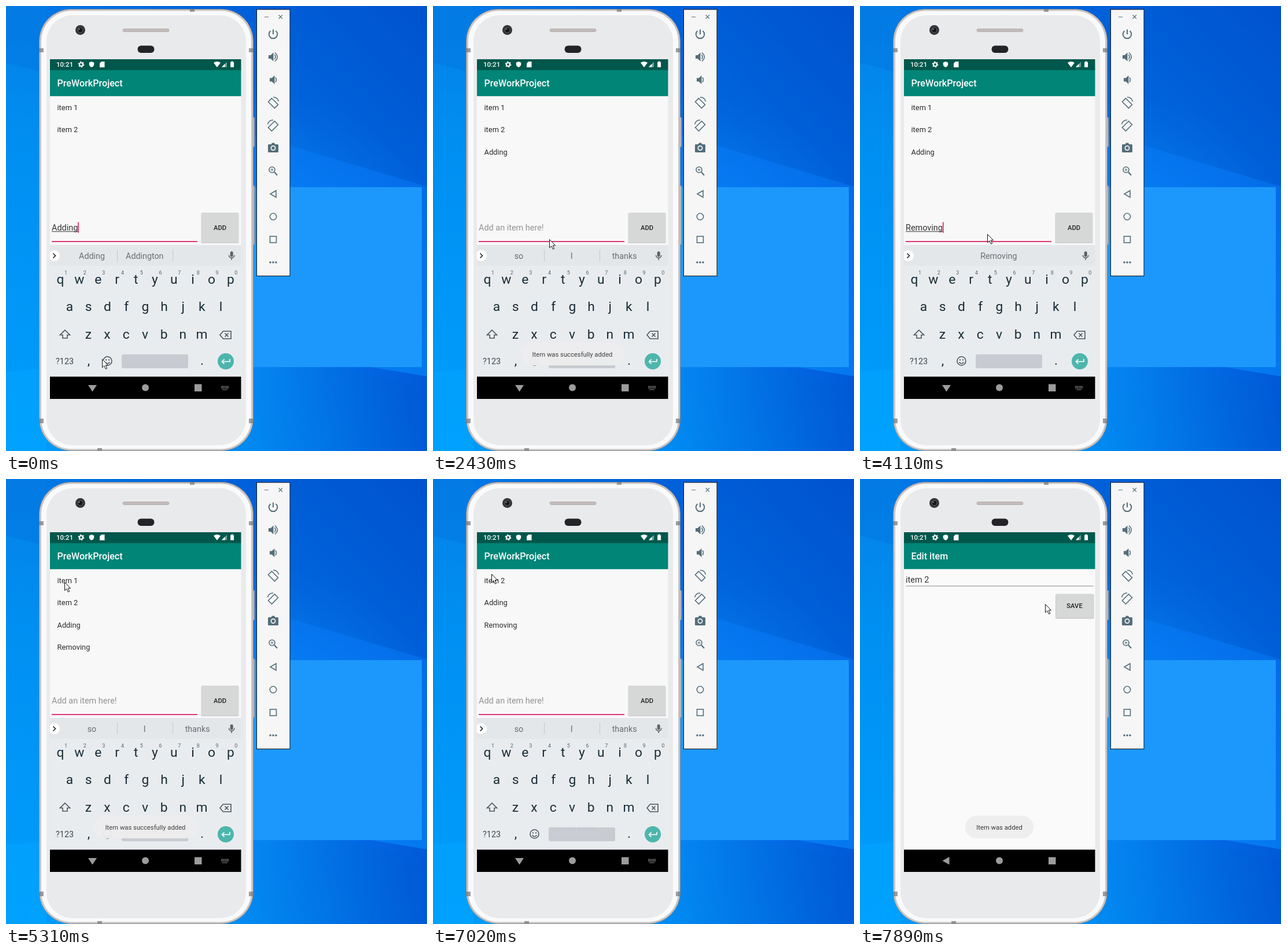
An HTML page that plays this animation: 728x769 px, repeating every 8000 ms.

```html
<!DOCTYPE html>
<html lang="en">
<head>
<meta charset="utf-8">
<title>List app demo</title>
<style>
  html, body { margin: 0; width: 100%; height: 100%; overflow: hidden; }
  svg { display: block; width: 100vw; height: 100vh; }
  text { font-family: Roboto, sans-serif; white-space: pre; }
  .mid { text-anchor: middle; }
  .bold { font-weight: 500; }
  .line { fill: none; stroke-width: 1.6; }
</style>
</head>
<body>
<svg viewBox="0 0 728 769">
  <defs>
    <linearGradient id="sky" x1="0" y1="1" x2="1" y2="0">
      <stop offset="0" stop-color="#009cfa"/><stop offset=".4" stop-color="#0088f0"/>
      <stop offset=".72" stop-color="#0064dc"/><stop offset="1" stop-color="#0052ce"/>
    </linearGradient>
    <radialGradient id="glow" gradientUnits="userSpaceOnUse" cx="440" cy="480" r="330">
      <stop offset="0" stop-color="#0a90fa" stop-opacity=".9"/><stop offset="1" stop-color="#0a80f0" stop-opacity="0"/>
    </radialGradient>
    <linearGradient id="left" x1="0" y1="0" x2="0" y2="1">
      <stop offset="0" stop-color="#0480e6"/><stop offset=".35" stop-color="#0090f2"/><stop offset="1" stop-color="#009efc"/>
    </linearGradient>
    <linearGradient id="shade" x1="0" y1="0" x2="1" y2="0">
      <stop offset="0" stop-color="#0058d8" stop-opacity="0"/><stop offset="1" stop-color="#0052d2" stop-opacity=".8"/>
    </linearGradient>
    <clipPath id="screen"><rect x="76" y="92" width="330.500" height="587"/></clipPath>
  </defs>

  <!-- wallpaper -->
  <rect width="728" height="769" fill="url(#sky)"/>
  <rect width="728" height="769" fill="url(#glow)"/>
  <rect width="70" height="769" fill="url(#left)"/>
  <path d="M0 98L70 116V0H0Z" fill="#0070dc" opacity=".35"/>
  <path d="M0 632L70 626V769H0Z" fill="#00a8ff" opacity=".4"/>
  <path d="M400 214L728 312V660L400 585Z" fill="#0a7cfa" opacity=".45"/>
  <path d="M400 586L728 640V769H400Z" fill="url(#shade)"/>
  <rect x="408" y="313" width="311" height="311" fill="#1c98fd"/>

  <!-- phone body -->
  <g fill="#d8d3d2" stroke="#8f8a8a" stroke-width=".8">
    <rect x="424" y="192" width="5.5" height="52" rx="2"/>
    <rect x="424" y="310" width="5.5" height="103" rx="2"/>
    <rect x="57.5" y="5.5" width="370" height="763" rx="55" fill="#cbc5c4"/>
  </g>
  <rect x="61" y="8.5" width="363" height="757" rx="52" fill="#fafafb"/>
  <rect x="70" y="16" width="345" height="743" rx="45" fill="#e9eaec"/>
  <path d="M57 73h8v7h-8zM420 73h8v7h-8zM57 713h8v8h-8zM420 713h8v8h-8zM318 5h8v5h-8zM158 764h8v4h-8z" fill="#77777a" opacity=".7"/>
  <circle cx="128.5" cy="41.500" r="8.500" fill="#343438"/>
  <circle cx="128.5" cy="41.500" r="4.500" fill="#17171a" stroke="#66666a"/>
  <circle cx="126.500" cy="40" r="1.200" fill="#888"/>
  <rect x="202" y="39.500" width="80" height="5" rx="2.500" fill="#c2bbba" stroke="#a29c9b" stroke-width=".6"/>
  <rect x="227.500" y="68.500" width="29" height="12.500" rx="6.200" fill="#242428"/>

  <g clip-path="url(#screen)">
    <rect x="76" y="91" width="331" height="588" fill="#f8f8f8"/>
    <rect x="76" y="110" width="331" height="45.800" fill="#008577"/>
    <rect x="76" y="91" width="331" height="19.800" fill="#00574b"/>
    <g fill="#fff">
      <text class="bold" x="87" y="105" font-size="11.500">10:21</text>
      <circle cx="130" cy="101" r="3" fill="none" stroke="#fff" stroke-width="2.200"/>
      <circle cx="130" cy="101" r="4.600" fill="none" stroke="#fff" stroke-width="1.600" stroke-dasharray="2 2.817"/>
      <path d="M148 96l4.200 1.700v3q0 3.600-4.200 5.300-4.200-1.700-4.200-5.300v-3z"/>
      <path d="M165 96h5.500v10h-8.500v-7z"/>
      <path d="M359 98q6-4 12 0l-6 8zM391 95.500h-1.300v1.200h-1.600v9h6v-9h-1.800v-1.200z"/>
      <path d="M382 96.500v9h-9z" opacity=".45"/><path d="M378.500 100v5.500h-5.500z"/>
    </g>
    <text id="title" class="bold" x="88.500" y="139.300" font-size="16.150" fill="#fff"></text>

    <g id="list">
      <g id="items" font-size="12.850" fill="#2b2b2b"></g>
      <text id="input" x="79" y="388" font-size="14.450"></text>
      <rect id="compose" x="79" y="389.300" height="1" fill="#333"/>
      <rect id="caret" y="373.500" width="1.600" height="18.500" fill="#d81b60"/>
      <rect x="79" y="406.200" width="252" height="1.700" fill="#d81b60"/>
      <rect x="337.500" y="358" width="65" height="52" rx="1.500" fill="#c9caca"/>
      <rect id="add" x="338" y="357" width="64" height="52" rx="1.500"/>
      <text class="mid bold" x="370" y="387" font-size="11.250" fill="#222">ADD</text>
    </g>

    <g id="edit">
      <rect x="76" y="155.800" width="331" height="486" fill="#fafafa"/>
      <text x="79" y="178.500" font-size="14.450" fill="#333">item 2</text>
      <rect x="79.500" y="184.500" width="324.500" height="1" fill="#8a8a8a"/>
      <rect x="338" y="199" width="66.500" height="42.500" rx="2" fill="#c8c9c9"/>
      <rect x="339" y="198.500" width="64.500" height="41.500" rx="1.500" fill="#d6d7d7"/>
      <text class="mid bold" x="371" y="223" font-size="11.250" fill="#222">SAVE</text>
    </g>

    <g id="keyboard">
      <rect x="76" y="413" width="331" height="228" fill="#e9ecef"/>
      <rect x="76" y="413" width="331" height="36" fill="#e4e7ea"/>
      <circle cx="83.500" cy="431.500" r="9.500" fill="#fff"/>
      <path class="line" d="M81.500 427.500l4 4-4 4" stroke="#222"/>
      <path id="dividers" d="M192.500 421v20M288.500 421v20" stroke="#c3c7ca"/>
      <g id="words" class="mid" font-size="14.300" fill="#686d71"></g>
      <rect x="387.700" y="424" width="5" height="9.500" rx="2.500" fill="#5c6266"/>
      <path class="line" d="M385.500 430.500a4.700 4.700 0 0 0 9.400 0M390.200 435.500v3.500" stroke="#5c6266" stroke-width="1.300"/>
      <g id="keys" class="mid" fill="#182c36"></g>
      <g class="line" stroke="#4c555b">
        <path d="M102 560l8.500 8.500h-4.500v5.500h-8v-5.500h-4.500z"/>
        <path d="M375.500 562h13.500v13h-13.500l-5.500-6.500zM378.500 565.500l6 6M384.500 565.500l-6 6"/>
        <circle cx="175.500" cy="613.500" r="7.500"/>
        <path d="M171.500 615.500q4 4.500 8 0"/>
      </g>
      <path d="M172 610.500h2v2h-2zM177 610.500h2v2h-2z" fill="#4c555b"/>
      <text x="86" y="619" font-size="14.400" fill="#3c464c">?123</text>
      <rect x="200" y="602" width="115" height="24" rx="3" fill="#c8cbd1"/>
      <circle cx="380" cy="614" r="14" fill="#4db6ac"/>
      <path class="line" d="M387 610v4.500h-13.500M377.500 610.500l-4 4 4 4" stroke="#fff"/>
    </g>

    <rect x="76" y="640.500" width="331" height="39"/>
    <g fill="#9c9c9c">
      <path id="back"/>
      <circle cx="241" cy="659.500" r="6"/>
      <rect x="326" y="653.500" width="12.500" height="12.500"/>
      <path id="switcher" d="M372 657.500h13M372 660h13M374.500 663h8" stroke="#9c9c9c" stroke-width="1.500" stroke-dasharray="1.500 .8"/>
    </g>

    <g id="toast">
      <rect id="pill" y="582" height="39" rx="19.500" fill="#eeeeef"/>
      <text id="message" class="mid" x="241" y="606" font-size="11.250" fill="#383838"></text>
    </g>
  </g>

  <!-- emulator tool bar -->
  <rect x="433.500" y="6" width="57.500" height="460.500" fill="#f6f6f6" stroke="#111"/>
  <g class="line" stroke="#546e7a" stroke-width="1.700">
    <path d="M447 19h7M471.500 15.500l6.500 6.500M478 15.500l-6.500 6.500" stroke-width="1.100"/>
    <path d="M462 40.500v8.500M457.500 43a7.300 7.300 0 1 0 9 0" stroke-width="2"/>
    <path d="M464.500 84q3 4 0 8M465 80.500q8.500 7.500 0 15"/>
    <path d="M466 123.500q3 4 0 8"/>
    <g id="rotate">
      <path d="M459.500 159.500l11 11-6 6-11-11z"/>
      <path d="M462 157.500q7.500 0 9.500 7.500" stroke-width="1.500"/>
    </g>
    <use href="#rotate" transform="matrix(-1 0 0 1 924 39.500)"/>
    <circle cx="460" cy="283" r="5"/>
    <path d="M464 287l5 5.500" stroke-width="2.200"/><path d="M457.500 283h5M460 280.500v5" stroke-width="1.100"/>
    <path d="M467 319v11.500l-10-5.700z"/>
    <circle cx="462" cy="364" r="5.700"/>
    <rect x="456.500" y="398" width="11" height="11"/>
  </g>
  <g fill="#546e7a">
    <path d="M454 85h3.500l5-4.500v15l-5-4.500h-3.500zM456 124.500h3.500l5-4.500v15l-5-4.500h-3.500z"/>
    <path d="M454.500 239h4l1.500-2.500h4l1.500 2.500h4q1.500 0 1.500 1.500v11q0 1.500-1.500 1.500h-15q-1.500 0-1.500-1.500v-11q0-1.500 1.500-1.500z"/>
    <circle cx="462" cy="245.500" r="3.600" fill="#546e7a" stroke="#f6f6f6" stroke-width="1.700"/>
    <circle cx="457" cy="443" r="1.800"/><circle cx="462" cy="443" r="1.800"/><circle cx="467" cy="443" r="1.800"/>
  </g>

  <path id="cursor" d="M.5.500v14.300l3.300-3.100 2.600 5.600 2.300-1-2.500-5.500h4.300z" fill="#fff" stroke="#111"/>
</svg>

<script>
const LOOP = 8000;
const $ = id => document.getElementById(id);
const set = (id, attrs) => Object.entries(attrs).forEach(([k, v]) => $(id).setAttribute(k, v));
const label = (x, y, text) => `<text x="${x}" y="${y}">${text}</text>`;

const idle = ['so', 'I', 'thanks'];

// Each step overrides part of the state from its time (ms) onward.
const steps = [
  [0, { cursor: [166, 610], input: 'Adding', caret: 1, words: ['Adding', 'Addington', ''], dividers: 1,
        items: ['item 1', 'item 2'], pressed: 0, toast: 'Item was succesfully added', fade: 0, edit: 0, drop: 0 }],
  [370, { cursor: [214, 560] }],
  [490, { cursor: [290, 478], caret: 0 }],
  [610, { cursor: [346, 409] }],
  [760, { cursor: [358, 388] }],
  [880, { cursor: [350, 382], caret: 1 }],
  [1030, { cursor: [338, 378], input: '', words: idle, items: ['item 1', 'item 2', 'Adding'], pressed: 1, fade: .2 }],
  [1180, { cursor: [335, 378], fade: .6 }],
  [1330, { cursor: [327, 380], pressed: 0, fade: .92 }],
  [1480, { cursor: [260, 393], fade: .95 }],
  [1600, { cursor: [201, 403], caret: 0 }],
  [2030, { caret: 1 }],
  [2430, { caret: 0 }],
  [2930, { input: 'R', caret: 1, words: ['R', 'Right', 'Really'] }],
  [3080, { input: 'Re', words: ['Re', 'Really', 'Ready'], fade: .85 }],
  [3200, { fade: .6 }],
  [3320, { input: 'Rem', words: ['Rem', 'Remember', 'Remind'], fade: .2 }],
  [3440, { input: 'Remo', words: ['Remo', 'Remote', 'Remove'], fade: 0 }],
  [3590, { input: 'Removi', words: ['Removi', 'Removing', 'Remove'] }],
  [3710, { input: 'Removing', words: ['Removing', 'Removings', ''] }],
  [3860, { words: ['', 'Removing', ''], dividers: 0 }],
  [4110, { cursor: [220, 394] }],
  [4260, { cursor: [285, 391], caret: 0 }],
  [4380, { cursor: [351, 385] }],
  [4530, { cursor: [351, 380], input: '', caret: 1, pressed: 1 }],
  [4680, { cursor: [335, 366], words: idle, dividers: 1, items: ['item 1', 'item 2', 'Adding', 'Removing'], fade: .3 }],
  [4800, { cursor: [270, 325], pressed: 0, fade: .7 }],
  [4920, { cursor: [175, 268], fade: .92 }],
  [5040, { cursor: [105, 221], caret: 0, fade: .95 }],
  [5190, { cursor: [102, 193] }],
  [5310, { cursor: [101, 178] }],
  [5590, { caret: 1 }],
  [6020, { caret: 0 }],
  [6140, { items: ['item 2', 'Adding', 'Removing'] }],
  [6260, { fade: .8 }],
  [6410, { cursor: [101, 169], caret: 1, fade: .35 }],
  [6530, { cursor: [101, 164], fade: 0 }],
  [6900, { caret: 0, toast: 'Item was added', fade: .01 }],
  [7020, { fade: .03 }],
  [7170, { fade: .4 }],
  [7290, { fade: .75 }],
  [7410, { cursor: [128, 168], edit: .5, drop: 50, fade: 1 }],
  [7530, { cursor: [185, 181], edit: 1, drop: 150 }],
  [7650, { cursor: [250, 199], drop: 240 }],
  [7770, { cursor: [298, 211] }],
  [7890, { cursor: [320, 216] }],
];

function buildKeys() {
  const row = (chars, x, y) => [...chars].map((c, i) => label(x + 32.7 * i, y, c)).join('');
  $('keys').innerHTML = `<g font-size="22.800">${
    row('qwertyuiop', 94, 480) + row('asdfghjkl', 110, 527) + row('zxcvbnm', 142.3, 574.5)
    + label(143, 620, ',') + label(339, 620, '.')}</g><g font-size="9" fill="#596167">${
    row('1234567890', 103.5, 463.5)}</g>`;
}

function render(t) {
  const s = Object.assign({}, ...steps.filter(([start]) => start <= t).map(([, change]) => change));

  $('title').textContent = s.edit ? 'Edit item' : 'PreWorkProject';
  $('items').innerHTML = s.items.map((item, i) => label(88.5, 179.5 + 38.6 * i, item)).join('');
  $('words').innerHTML = s.words.map((word, i) => label(148.5 + 91.3 * i, 437, word)).join('');
  set('dividers', { opacity: s.dividers });

  $('input').textContent = s.input || 'Add an item here!';
  set('input', { fill: s.input ? '#333' : '#929292' });
  const width = s.input ? $('input').getComputedTextLength() : 0;
  set('compose', { width });
  set('caret', { x: 79 + width, opacity: s.caret });
  set('add', { fill: s.pressed ? '#d2d2d3' : '#d6d7d7' });

  set('edit', { opacity: s.edit });
  set('keyboard', { transform: `translate(0 ${s.drop})` });
  const open = s.drop < 200;
  set('back', { d: open ? 'M142 655h15l-7.500 11.500z' : 'M154.500 653v13.500l-12-6.700z' });
  set('switcher', { opacity: +open });

  $('message').textContent = s.toast;
  const pillWidth = $('message').getComputedTextLength() + 38.5;
  set('pill', { x: 241 - pillWidth / 2, width: pillWidth });
  set('toast', { opacity: s.fade });
  set('cursor', { transform: `translate(${s.cursor})` });
}

buildKeys();
const begin = performance.now();
function tick() {
  render((performance.now() - begin) % LOOP);
  requestAnimationFrame(tick);
}
tick();
</script>
</body>
</html>
```
